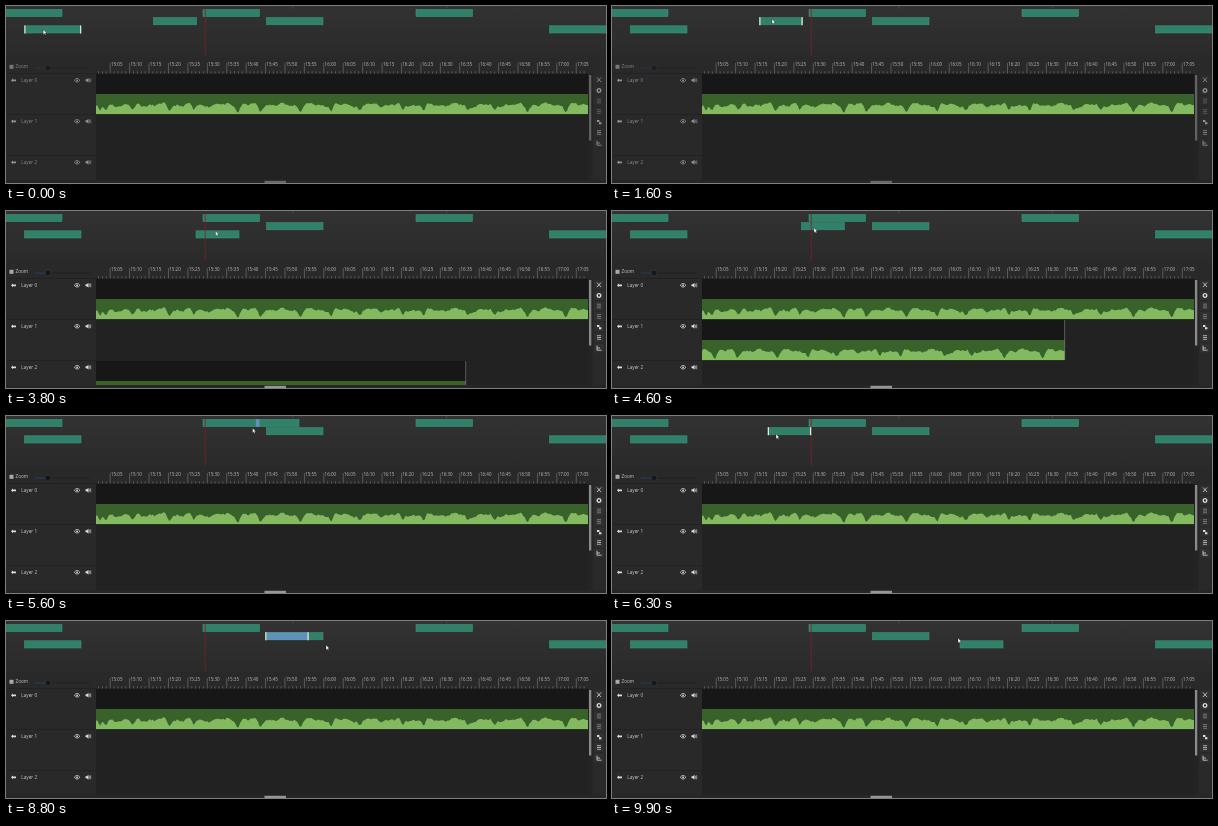
Write an HTML page that moves like this. It is 600 px wide and 177 px high and loops after 10 s.

```html
<!DOCTYPE html>
<html lang="en">
<head>
<meta charset="utf-8">
<title>Timeline drag</title>
<style>
html, body { margin: 0; width: 100%; height: 100%; overflow: hidden; background: #292929; }
svg { display: block; width: 100vw; height: 100vh; font-family: "Open Sans", "Noto Sans", sans-serif; }
</style>
</head>
<body>
<svg id="stage" viewBox="0 0 600 177">
  <defs>
    <linearGradient id="sky" x2="0" y2="1">
      <stop offset="0" stop-color="#323232"/>
      <stop offset="1" stop-color="#2a2a2a"/>
    </linearGradient>
    <clipPath id="view"><rect x="90" y="68" width="492" height="106"/></clipPath>
  </defs>
</svg>
<script>
const LOOP = 10000, STEP = 100, W = 43;
const VIEW = { x0: 90, x1: 582, from: 198, scale: 10.57 };
const rowY = row => 3 + row * 8.2;
const layerY = row => 68 + row * 41;
const ROWS = [0, 1, 2];
const FIXED = [[-1, 0, 57], [18.5, 2, 56.5], [197, 0, 56.5], [260.5, 1, 56.5], [410, 0, 56.5], [543.5, 2, 57]];

// time, block x, block row
const DRAG = [
  [0, 147.5, 1], [1800, 147.5, 1], [2500, 60, 2], [2700, 32, 2], [2900, 32, 2],
  [3300, 135, 1], [3500, 203, 2], [3800, 190, 2], [4000, 190, 2], [4400, 218, 2],
  [4700, 175, 1], [5100, 232, 1], [5300, 240, 0], [5600, 250, 0], [5800, 232, 0],
  [6000, 190, 1], [6300, 156, 1], [6600, 176, 1], [6900, 150, 2], [7000, 150, 2],
  [7500, 47, 2], [8100, 166, 2], [8300, 215, 2], [8500, 259, 1], [8800, 259.5, 1],
  [9200, 444, 2], [9700, 425, 2], [9900, 348, 2]
];
// time, pointer offset from the block
const POINTER = [
  [0, -110.3, 12.3], [100, -110.5, 11.3], [300, -110.5, 11.3], [700, -6.5, 1.3],
  [1200, -5.5, 1.3], [1600, 12.5, 1.8], [2500, 12.5, 1.8], [2800, 10.5, 0.8],
  [3800, 19.5, 0.6], [4100, 13, 2], [5300, 12, 4], [5600, -3.5, 9], [5900, 13, 4],
  [6300, 8, 6.8], [6600, 12, 4], [8600, 13, 4], [8800, 60.5, 12.8], [8900, 32, 13],
  [9200, 12, 18.6], [9700, 12, 9.6], [9900, -2, -2.4]
];
// spans in which the moving block has its end handles lit
const LIT = [[1400, 2000], [2700, 3000], [6200, 6400], [8500, 8900]];

const svg = document.getElementById('stage');
function el(tag, attrs, parent = svg, text) {
  const node = document.createElementNS('http://www.w3.org/2000/svg', tag);
  set(node, attrs);
  if (text) node.textContent = text;
  parent.append(node);
  return node;
}
function set(node, attrs) {
  for (const k in attrs) node.setAttribute(k, attrs[k]);
}
const rect = (x, y, width, height, fill, parent) => el('rect', { x, y, width, height, fill }, parent);
const path = (d, attrs, parent) => el('path', { d, ...attrs }, parent);
const show = (node, on) => node.setAttribute('visibility', on ? 'visible' : 'hidden');

function buildBackdrop() {
  rect(0, 0, 600, 177, '#292929');
  rect(0, 0, 600, 51, 'url(#sky)');
  rect(286.5, 0, 0.6, 2.5, '#555');
  rect(440, 0, 0.6, 2.5, '#555');
  rect(90, 68, 492, 106, '#222');
  for (const i of ROWS) rect(0, layerY(i) - 0.6, 582, 0.6, '#1e1e1e');
  rect(582, 68, 4.5, 106, '#242424');
  rect(0, 174.3, 600, 2.7, '#262626');
}

function buildRuler() {
  let ticks = '';
  for (let i = -3; i < 125; i++) {
    const x = 104.2 + i * 3.884;
    const major = i >= 0 && i % 5 === 0;
    if (x > 581) break;
    ticks += `M${x.toFixed(2)} ${major ? 57 : 65.3}V67.5`;
    if (!major) continue;
    const s = 905 + i;
    const label = Math.floor(s / 60) + ':' + String(s % 60).padStart(2, '0');
    el('text', { x: x + 0.8, y: 59.8, 'font-size': 4.5, fill: '#bbb' }, svg, label);
  }
  path(ticks, { stroke: '#8a8a8a', 'stroke-width': 0.5 });
}

// Waveform outline: smooth ripple, seeded grain and regular deep gaps
function wavePath() {
  let seed = 11;
  const rnd = () => (seed = (seed * 16807) % 2147483647) / 2147483647;
  const gaps = [4, 10];
  for (let i = 0; i < 14; i++) gaps.push(37 + i * 33 + 6 * Math.sin(i * 2.6));
  let d = 'M0 40';
  for (let x = 0; x <= 492; x += 1.5) {
    let h = 8.2 + 1.3 * Math.sin(x / 4.7) + 0.9 * Math.sin(x / 2.1 + 1) + rnd() * 1.8;
    for (const g of gaps) h -= 6 * Math.exp(-(((x - g) / 2.4) ** 2));
    d += `L${x} ${(40 - Math.max(1.2, h)).toFixed(1)}`;
  }
  return d + 'L492 40Z';
}

function buildClip(wave) {
  const g = el('g', {}, clips);
  rect(0, 0, 492, 20, '#171717', g);
  rect(0, 20, 492, 20.3, '#39622b', g);
  path(wave, { fill: '#83b95f' }, g);
  return g;
}

function buildControls() {
  const g = el('g', {});
  const line = { fill: 'none', stroke: '#ddd', 'stroke-width': 0.8 };
  const solid = { fill: '#ddd' };
  rect(3.5, 58.8, 4, 4, '#aaa', g);
  el('text', { x: 9.6, y: 62.3, 'font-size': 4.6, fill: '#ccc' }, g, 'Zoom');
  path('M29 62H84', { stroke: '#202020', 'stroke-width': 1.2 }, g);
  path('M29 62H42', { stroke: '#24415f', 'stroke-width': 1.2 }, g);
  el('circle', { cx: 42, cy: 62, r: 3, fill: '#171717', stroke: '#444', 'stroke-width': 0.5 }, g);
  for (const i of ROWS) {
    const row = el('g', { transform: `translate(0 ${layerY(i) + 6.3})` }, g);
    path('M5 0l2-1.8v1h3v1.8h-3v1z', solid, row);
    el('text', { x: 15.3, y: 1.6, 'font-size': 4.7, fill: '#ccc' }, row, 'Layer ' + i);
    path('M68.3 0q2.8-3.6 5.6 0q-2.8 3.6-5.6 0z', line, row);
    el('circle', { cx: 71.1, r: 0.9, ...solid }, row);
    path('M79.5-1h1.3l1.7-1.5v5l-1.7-1.5h-1.3z', solid, row);
    path('M83.4-1.5v3M84.7-2v4', { ...line, 'stroke-width': 0.6 }, row);
  }
  rect(583, 69, 2.3, 65.5, '#8a8a8a', g);
  rect(258.5, 174.8, 21.5, 2.2, '#969696', g);
  for (let i = 0; i < 7; i++) {
    const tool = el('g', { transform: `translate(593 ${74 + i * 10.5})` }, g);
    rect(-5, -4.4, 10, 8.8, '#303030', tool);
    if (i === 0) path('M-2-2.5l4 4.5M2-2.5l-4 4.5', line, tool);
    else if (i === 1) el('circle', { r: 1.8, ...line, 'stroke-width': 1.3 }, tool);
    else if (i === 4) path('M-2-2h2.4v2.2h2v2h-2.4v-2.2h-2z', solid, tool);
    else if (i === 6) path('M-2-2.4v4.6h4.6M-2 0h3', line, tool);
    else path('M-2-1.8h4M-2 0h4M-2 1.8h4', { ...line, stroke: i === 5 ? '#ccc' : '#888' }, tool);
  }
  return g;
}

function block(x, row, width) {
  return el('rect', {
    x, y: rowY(row) + 0.4, width, height: 7.2,
    fill: '#31806a', stroke: '#3b9173', 'stroke-width': 0.6
  });
}
const edges = (x, row, w) => `M${x + 0.4} ${rowY(row)}v8M${x + w - 0.4} ${rowY(row)}v8`;

buildBackdrop();
buildRuler();
const clips = el('g', { 'clip-path': 'url(#view)' });
const wave = wavePath();
set(buildClip(wave), { transform: 'translate(90 68)' });
const clip = buildClip(wave);
const clipEnd = rect(0, 0, 0.7, 40, '#777', clips);
const controls = buildControls();
FIXED.forEach(b => block(...b));
const moving = block(0, 0, W);
const overlap = rect(0, 0, 0, 7.6, '#5f92b8');
rect(198.8, 3, 0.8, 47, '#7d2028');
const hover = path(edges(18.5, 2, 56.5), { stroke: '#d5e5d2', 'stroke-width': 1.2 });
const grips = path('', { stroke: '#e6ead2', 'stroke-width': 1.2 });
const pointer = path('M0 0V4.9L1.2 3.9L2 5.6L2.8 5.2L2 3.6H3.5Z', { fill: '#fff', stroke: '#111', 'stroke-width': 0.35 });

function sample(keys, t) {
  const i = keys.findIndex(k => k[0] > t);
  if (i < 0) return keys[keys.length - 1].slice(1);
  const a = keys[i - 1], b = keys[i], p = (t - a[0]) / (b[0] - a[0]);
  return a.slice(1).map((v, n) => v + (b[n + 1] - v) * p);
}

function draw(time) {
  const t = Math.floor((time % LOOP) / STEP) * STEP;
  const [x, lane] = sample(DRAG, t);
  const [dx, dy] = sample(POINTER, t);
  const row = Math.round(lane), y = rowY(row);
  set(moving, { x, y: y + 0.4 });
  set(pointer, { transform: `translate(${x + dx} ${rowY(lane) + dy})` });
  set(controls, { opacity: t < 1900 ? 0.6 : 1 });
  show(hover, t < 500);
  show(grips, LIT.some(([a, b]) => t >= a && t < b));
  set(grips, { d: edges(x, row, W) });

  const other = FIXED.find(b => b[1] === row && b[0] < x + W && b[0] + b[2] > x);
  show(overlap, other);
  if (other) {
    const from = Math.max(x, other[0]), to = Math.min(x + W, other[0] + other[2]);
    set(overlap, { x: from, y: y + 0.2, width: to - from });
  }

  // The lower view magnifies the part just after the playhead
  const toView = v => VIEW.x0 + (v - VIEW.from) * VIEW.scale;
  const left = toView(x), right = toView(x + W);
  const inside = row > 0 && right > VIEW.x0 + 12 && left < VIEW.x1;
  show(clip, inside);
  show(clipEnd, inside);
  if (inside) {
    const top = layerY(row);
    // the clip always reaches past one side of the view
    const shift = left > VIEW.x0 ? left : Math.min(right, VIEW.x1) - 492;
    set(clip, { transform: `translate(${shift} ${top})` });
    set(clipEnd, { x: right - 0.5, y: top });
  }
}

const start = performance.now();
function tick(now) {
  draw(Math.max(0, now - start));
  requestAnimationFrame(tick);
}
draw(0);
requestAnimationFrame(tick);
</script>
</body>
</html>
```
